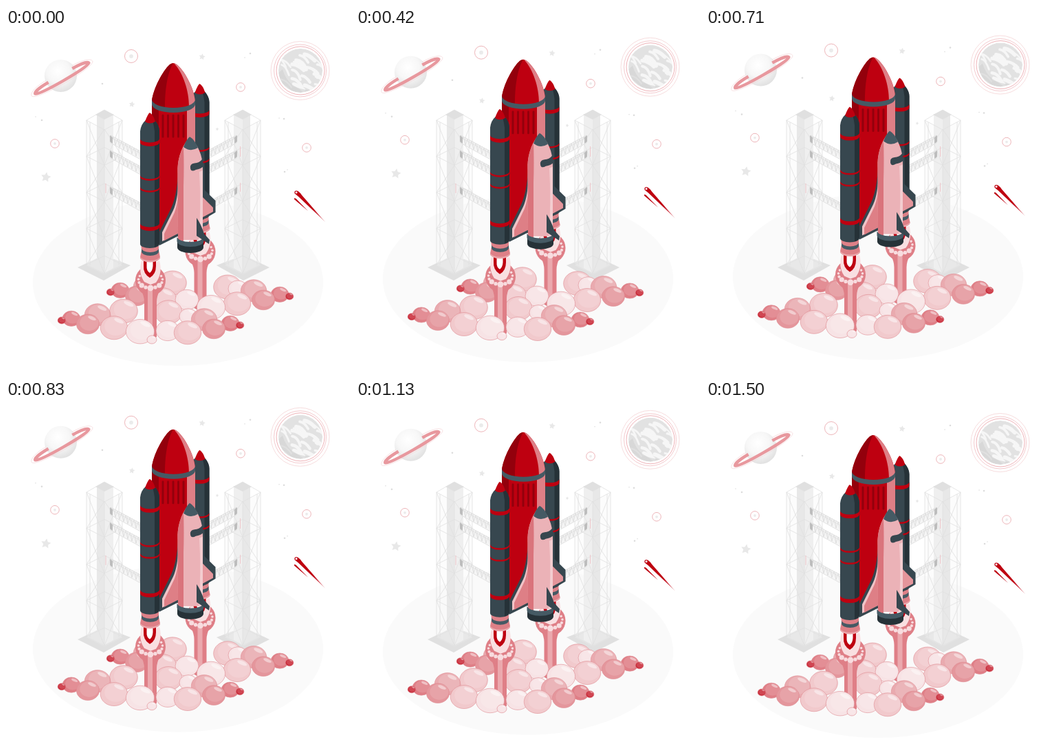
These frames come from a looping animation (500 px wide and 500 px high, 1540 ms). An HTML page:

```html
<!DOCTYPE html>
<html lang="en">
<head>
<meta charset="utf-8">
<title>Rocket launch</title>
<style>
html, body { margin: 0; width: 100%; height: 100%; overflow: hidden; background: #fff; }
svg { display: block; width: 100vw; height: 100vh; }
</style>
</head>
<body>
<svg viewBox="0 0 500 500">
  <defs>
    <radialGradient id="globe" cx=".42" cy=".35" r=".7">
      <stop offset="0" stop-color="#fff"/><stop offset=".5" stop-color="#f7f7f7"/><stop offset="1" stop-color="#dedede"/>
    </radialGradient>
    <linearGradient id="tail" x1="0" y1="0" x2="1" y2="1">
      <stop offset=".6" stop-color="#be0010"/><stop offset="1" stop-color="#be0010" stop-opacity=".35"/>
    </linearGradient>
    <clipPath id="moonClip"><circle cx="428" cy="62" r="32"/></clipPath>

    <g id="tower">
      <path d="M142 330L181 345 142 367 104 348Z" fill="#e0e0e0"/>
      <path d="M117 134L143 148V358L117 345ZM169 134L143 148V358L169 345Z" fill="#f5f5f5" opacity=".35"/>
      <path d="M132 125L143 131V356L132 350Z" fill="#e8e8e8"/>
      <path d="M143 131L156 125V349L143 356Z" fill="#efefef"/>
      <g id="frame" fill="none" stroke="#e0e0e0" stroke-width=".8"></g>
      <path d="M143 119L157 126 143 133 130 126Z" fill="#e0e0e0"/>
      <g id="arms" fill="none" stroke="#dcdcdc" stroke-width=".8"></g>
    </g>

    <g id="booster">
      <path d="M196 312H222V323L224 333A14.500 7 0 0 1 195 333L197 323Z" fill="#de8087"/>
      <g id="nozzleBands"></g>
      <path d="M195 150Q196 140 203 134H216Q223 142 223 150V314A14 6 0 0 1 195 314Z" fill="#37474f"/>
      <path d="M213 134H216Q223 142 223 150V314Q220 318 216 319V150Q215 142 213 134Z" fill="#263238"/>
      <path d="M202 136Q206 125 209 123Q214 126 217 136Q209 141 202 136Z" fill="#be0010"/>
      <g id="boosterBands"></g>
    </g>

    <g id="plume">
      <path d="M196 380Q201 390 201 398V449Q210 456 219 449V398Q219 390 224 380Z" fill="#df7f87"/>
      <circle cx="210" cy="367" r="22" fill="#df7f87"/>
      <path d="M206 380H213V450Q209 452 206 450Z" fill="#eba9ae"/>
      <path d="M197 338Q210 346 223 338Q228 356 218 370L210 373 201 369Q192 356 197 338Z" fill="#f9dfe1"/>
      <path d="M200 336H218V346Q218 358 209 363Q199 357 200 345Z" fill="#be0010"/>
      <path d="M204.500 336H213.500V346Q213 353 209 356Q204 353 204.500 346Z" fill="#fff"/>
      <g id="foam" fill="#f8dcdf"></g>
    </g>
  </defs>

  <g class="float">
    <ellipse cx="250" cy="370" rx="211" ry="121" fill="#fafafa"/>
    <g id="sky"></g>

    <circle cx="79.500" cy="69.500" r="23.500" fill="url(#globe)"/>
    <g transform="translate(81 72.500) rotate(-29.800)" fill="none">
      <path d="M-20 -4C-34 -4 -45 -2 -45 1C-45 6 45 6 45 1C45 -2 34 -4 20 -4" stroke="#e8989e" stroke-width="4.500"/>
      <path d="M-22 -8C-38 -8 -51 -4 -51 1C-51 11 51 11 51 1C51 -4 38 -8 22 -8" stroke="#f3d3d5" stroke-width=".6"/>
    </g>

    <g fill="none" stroke="#eaa0a6" stroke-width=".8">
      <circle cx="428" cy="62" r="35"/><circle cx="427.500" cy="62" r="38" stroke="#f0bcc0"/><circle cx="427.500" cy="62" r="42.500" stroke="#f4d3d5"/>
    </g>
    <g clip-path="url(#moonClip)">
      <circle cx="428" cy="62" r="32" fill="#e2e2e2"/>
      <g id="marble" stroke="#f6f6f6" stroke-linecap="round" fill="none"></g>
      <path d="M396 65Q399 91 428 94L444 90Q411 91 402 60Z" fill="#d2d2d2" opacity=".6"/>
    </g>

    <path d="M419.500 240.500Q418.500 236 422.500 236.500Q426 237 430 243L464 282 425 245Z" fill="url(#tail)"/>
    <circle cx="422" cy="239" r="1.500" fill="#fff"/>
    <path d="M419 249Q418 246 421.500 248L439 266Z" fill="#be0010"/>
  </g>

  <use href="#tower"/>
  <use href="#tower" transform="translate(487 0) scale(-1 1)"/>
  <path d="M145 226V240M340.500 172V187M340.500 225V238" stroke="#efbcc0" stroke-width=".8"/>

  <g class="float">
    <g id="clouds"></g>
    <use href="#booster" x="72.500" y="-42"/>

    <path d="M212 106H275V303H212Z" fill="#be0010"/>
    <path d="M212 106H222V303H212Z" fill="#93000c"/>
    <path d="M263 106H275V303H263Z" fill="#de7f86"/>
    <g id="ribs" stroke="#93000c" stroke-width="3" stroke-linecap="round"></g>
    <path d="M212 106C214 88 228 62 238 53Q243 49 248 53C258 60 273 86 275 106A31.500 12 0 0 1 212 106Z" fill="#be0010"/>
    <path d="M212 106C214 88 228 62 238 53L243 51C234 66 231 92 231 116Q216 113 212 106Z" fill="#93000c"/>
    <path d="M275 106C273 86 258 60 248 53L244 51C258 66 266 92 266 114Q273 111 275 106Z" fill="#de7f86"/>
    <g id="tankBand"></g>

    <use href="#booster"/>

    <path d="M251 195Q250 240 240 262L223 296V316L253 301Z" fill="#37474f"/>
    <path d="M251 218Q250 250 243 265L227 297V310L253 297Z" fill="#f1c3c7"/>
    <path d="M251 232Q250 255 245 268L230 299V309L253 297Z" fill="#de7f86"/>
    <path d="M284 231L304.500 251V268L284 280Z" fill="#37474f"/>
    <path d="M284 244L301 261V267L284 276Z" fill="#e4959b"/>
    <path d="M249.500 204C250 186 257 170 267 158C279 170 286 184 286 205V308H250Z" fill="#ebb2b7"/>
    <path d="M249.500 204C250 192 253 181 258 173Q259 200 258 230V312L250 308Z" fill="#da747c"/>
    <path d="M286 207V308H280Q284 260 281 209Z" fill="#f3cdd0"/>
    <path d="M258 173Q262 162 267 158Q274 162 279 174Q268 181 258 173Z" fill="#455a64"/>
    <path d="M268 204Q267 197 274 196.500Q281 196 285 191Q287 195 287 201Q283 205 276 206Q269 210 268 204Z" fill="#37474f"/>
    <g id="engine"></g>
    <path d="M277 276Q283 284 288 299L296 308 295 314 277 302Z" fill="#37474f"/>
  </g>
</svg>
<script>
const $ = id => document.getElementById(id);
const range = (n, make) => Array.from({ length: n }, (_, i) => make(i)).join('');
const circle = (x, y, r, attrs = '') => `<circle cx="${x}" cy="${y}" r="${r}" ${attrs}/>`;
const path = (d, attrs = '') => `<path d="${d}" ${attrs}/>`;

let seed = 7;
const random = () => (seed = seed * 16807 % 2147483647) / 2147483647;

// A hoop around the front of an upright cylinder
function hoop(left, right, y, height, sag, color) {
  const rx = (right - left) / 2;
  return path(`M${left} ${y}A${rx} ${sag} 0 0 0 ${right} ${y}v${height}A${rx} ${sag} 0 0 1 ${left} ${y + height}Z`, `fill="${color}"`);
}
const red = '#be0010', slate = '#455a64';
$('boosterBands').innerHTML = [161, 284].map(y => hoop(195, 223, y, 5.5, 5.5, red)).join('') +
  [214, 231].map(y => hoop(195, 223, y, 2.5, 5.5, red)).join('');
$('nozzleBands').innerHTML = hoop(197, 222, 320, 5, 6, slate) + hoop(195, 224, 331, 2.5, 7, '#eaa6ab');
$('tankBand').innerHTML = hoop(212, 275, 104, 7, 12, slate);
$('engine').innerHTML = hoop(249, 287, 304, 15, 8, '#263238') + hoop(248.5, 287.5, 303, 7, 8, slate);
$('ribs').innerHTML = range(5, i => path(`M${228 + 7.5 * i} 127V158`));

function star(x, y, r) {
  const points = range(10, i => {
    const a = i * Math.PI / 5 - 1.4, k = i % 2 ? r * .5 : r;
    return `${x + k * Math.cos(a)},${y + k * Math.sin(a)} `;
  });
  return `<polygon points="${points}" fill="#e8e8e8"/>`;
}
const orb = (x, y, r) => circle(x, y, r, 'fill="#fff" stroke="#e9a3a8" stroke-width=".8"') +
  circle(x, y, r * .3, 'fill="#ebebeb"');
const dots = [[140, 81], [43, 129], [52, 134], [347, 43], [355, 37], [397, 131], [404, 132], [409, 206], [405, 209]];
$('sky').innerHTML = orb(182, 41, 9.5) + orb(341, 86, 6.3) + orb(71, 168, 6.3) + orb(437, 174, 6.3) +
  dots.map(([x, y], i) => circle(x, y, i % 2 ? .8 : 1.3, 'fill="#dcdcdc"')).join('') +
  star(285, 42, 4.8) + star(58, 217, 7.5) + star(183, 111, 4.5) + star(307, 147, 2.5);

$('marble').innerHTML = range(24, () => path(
  `M${396 + 60 * random()} ${30 + 58 * random()}q${5 + 5 * random()} 1 ${10 + 8 * random()} ${8 + 7 * random()}`,
  `stroke-width="${2 + 4 * random()}"`));

// Lattice: uprights, then a chevron and cross braces on each storey
const storey = 52.5;
$('frame').innerHTML = path('M117 134L143 119 169 134 143 148ZM117 134V345M169 134V345M143 148V358M122 137V345M164 137V345') +
  range(4, i => {
    const y = 134 + storey * i, b = y + storey;
    return path(`M117 ${b}L143 ${b + 13} 169 ${b}L143 ${b - 13}ZM117 ${y}L143 ${b + 13}L169 ${y}M117 ${b}L143 ${y + 13}L169 ${b}`);
  });

$('arms').innerHTML = [156, 178, 231].map(y =>
  path(`M152 ${y}l45 24v12l-45 -25ZM152 ${y + 3}l45 24` +
    range(8, i => `M${153 + 6 * i} ${y + 3.2 * i}v11l3 -9 3 12`), 'fill="#f5f5f5"') +
  path(`M151 ${y}l4 3v9l-4 -3Z`, 'fill="#bdbdbd" stroke="none"')).join('');

$('foam').innerHTML = range(11, i => {
  const a = Math.PI * (i / 10 * 1.3 - .15), s = Math.sin(a);
  return circle(210 + 17.5 * Math.cos(a), 366 + 12 * s, 1.8 + (i % 2 ? 2.6 : 1) * Math.max(s, 0));
});

const tints = ['#f7e3e5', '#f1c9cc', '#f1c9cc', '#e9aaaf', '#e4969c', '#df7e86', '#c92b39'];
function puff({ x, y, r, tint }) {
  const oval = (dx, dy, w, h, attrs) =>
    `<ellipse cx="${x + dx * r}" cy="${y + dy * r}" rx="${w * r}" ry="${h * r}" ${attrs}/>`;
  return oval(0, 0, 1, .86, `fill="${tints[tint]}" stroke="#df8b92" stroke-width=".6"`) +
    oval(.12, -.12, .82, .69, 'fill="#fff" opacity=".13"') +
    `<g transform="rotate(24 ${x} ${y})">${oval(.12, -.62, .38, .14, 'fill="#fff" opacity=".45"')}</g>`;
}

// Each trail zigzags inward from its tip, the puffs growing and paling on the way
const trail = (x, y, dir, count) => Array.from({ length: count }, (_, i) => ({
  x: x + dir * (19 * i - i % 2 * 5),
  y: y + (i % 2 ? -2.7 : 2.7) * i,
  r: 21 * (1 - .72 * Math.exp(-i / 1.6)),
  tint: 6 - i
}));
const puffs = [
  ...trail(412, 390, -1, 7), ...trail(81, 425, 1, 7), ...trail(340, 432, -1, 5), ...trail(152, 384, 1, 6),
  { x: 337, y: 379, r: 14, tint: 0 }, { x: 263, y: 395, r: 17, tint: 0 }, { x: 236, y: 413, r: 20, tint: 1 },
  { x: 265, y: 419, r: 13, tint: 0 }, { x: 235, y: 440, r: 17, tint: 0 }, { x: 212, y: 453, r: 7, tint: 0 }
];
const layers = [
  ...puffs.map(p => ({ y: p.y, svg: puff(p) })),
  { y: 394, svg: '<use href="#plume" x="72.5" y="-42"/>' },
  { y: 439, svg: '<use href="#plume"/>' }
];
$('clouds').innerHTML = layers.sort((a, b) => a.y - b.y).map(l => l.svg).join('');

const period = 1540, lead = 25, lift = 8.5;
const floats = document.querySelectorAll('.float');
function draw(now) {
  const y = lift / 2 * (Math.cos(2 * Math.PI * (now + lead) / period) - 1);
  floats.forEach(g => g.setAttribute('transform', `translate(0 ${y.toFixed(3)})`));
}
const start = performance.now();
function tick() {
  draw(performance.now() - start);
  requestAnimationFrame(tick);
}
tick();
</script>
</body>
</html>
```
